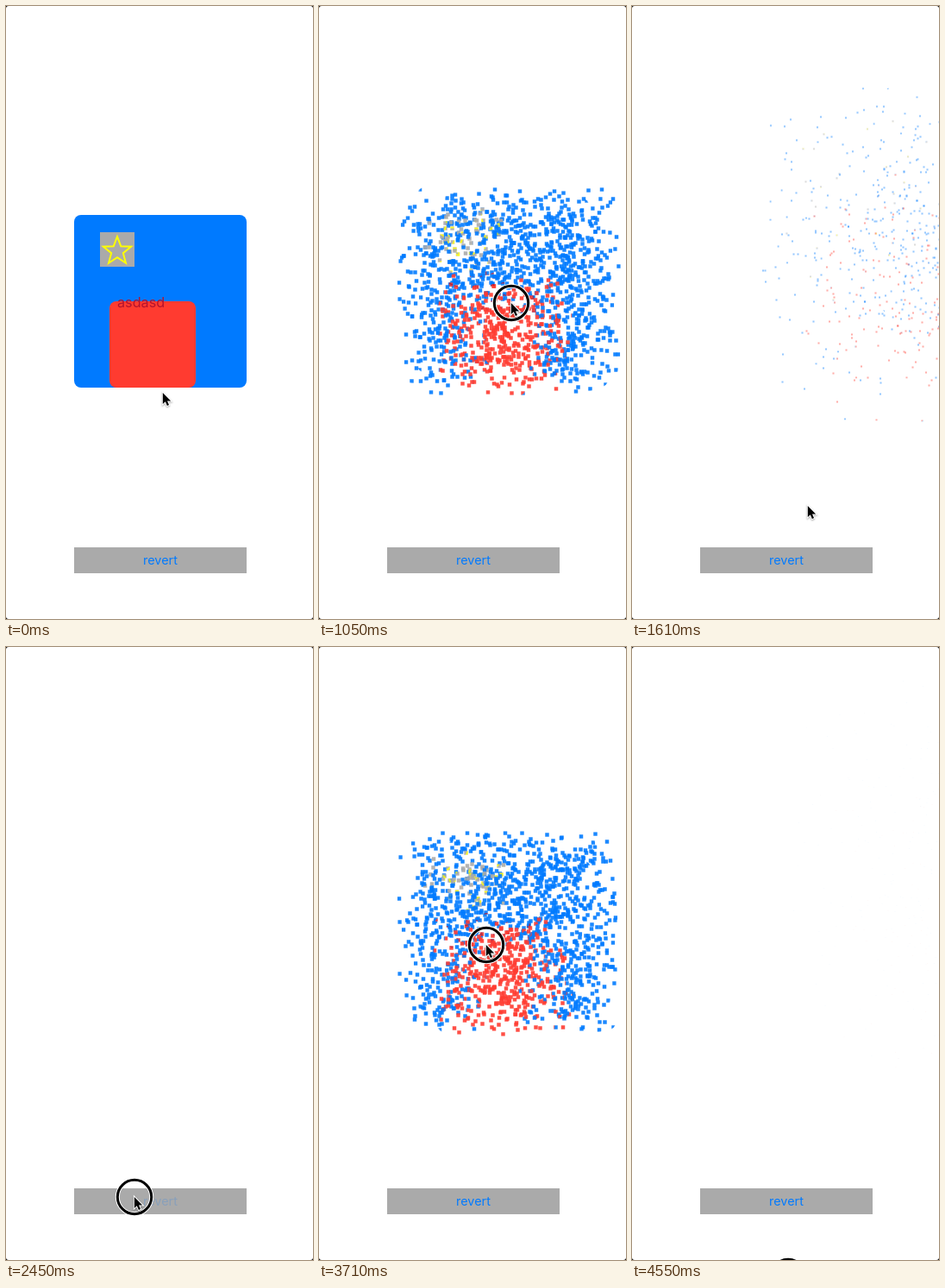
Write an HTML page with a canvas that moves like this. It is 356 px wide and 710 px high and loops after 4.62 s.

```html
<!DOCTYPE html>
<html lang="en">
<head>
<meta charset="utf-8">
<title>Shatter and revert</title>
<style>
  html, body { margin: 0; width: 100%; height: 100%; overflow: hidden; background: #000; }
  canvas { display: block; }
</style>
</head>
<body>
<canvas id="stage" width="356" height="710"></canvas>
<script>
const LOOP = 4620, STEP = 70, LIFE = 1150, FADE = 280;
const CELL = 5, SIZE = 200, LEFT = 79, TOP = 242;
const BLUE = '#007aff', GREY = '#aaaaaa';
const BOOMS = [835, 3495], REVERT = 2380, RELEASE = 2590;
const TAPS = [910, REVERT, 3570, 4480];
const ctx = document.getElementById('stage').getContext('2d');
const clamp = v => Math.max(0, Math.min(1, v));
const mix = (a, b, k) => a + (b - a) * k;
const snap = (v, unit) => Math.round(v / unit) * unit;

// Pointer rests at its start, then makes these moves
const START = { x: 181, y: 447 };
const MOVES = [
  { from: 0, to: 140, x: 181, y: 375 },
  { from: 280, to: 490, x: 234, y: 317 },
  { from: 490, to: 700, x: 222, y: 343 },
  { from: 1330, to: 1610, x: 203, y: 578 },
  { from: 1610, to: 2170, x: 148, y: 636 },
  { from: 2870, to: 3290, x: 193, y: 344 },
  { from: 3780, to: 3990, x: 209, y: 708 },
  { from: 3990, to: 4410, x: 180, y: 728 }
];

function seeded(seed) {
  return () => {
    seed = (seed + 0x6D2B79F5) | 0;
    let n = Math.imul(seed ^ (seed >>> 15), 1 | seed);
    n = (n + Math.imul(n ^ (n >>> 7), 61 | n)) ^ n;
    return ((n ^ (n >>> 14)) >>> 0) / 4294967296;
  };
}

function makeCells(seed) {
  const rand = seeded(seed), cells = [];
  for (let y = 0; y < SIZE; y += CELL)
    for (let x = 0; x < SIZE; x += CELL)
      cells.push({ x, y, dx: mix(102, 680, rand()), dy: mix(-218, 60, rand()) });
  return cells;
}

function roundBox(c, x, y, w, h, r, color) {
  c.fillStyle = color;
  c.beginPath();
  c.roundRect(x, y, w, h, r);
  c.fill();
}

function label(c, text, x, y, size, color, align) {
  c.font = `${size}px Inter, Roboto, sans-serif`;
  c.textAlign = align;
  c.fillStyle = color;
  c.fillText(text, x, y);
}

function makeCard() {
  const card = document.createElement('canvas');
  card.width = card.height = SIZE;
  const c = card.getContext('2d');
  roundBox(c, 0, 0, SIZE, SIZE, 8, BLUE);
  c.fillStyle = GREY;
  c.fillRect(30, 20, 40, 40);
  c.beginPath();
  for (let i = 0; i < 10; i++) {
    const r = i % 2 ? 7.2 : 17, a = i * Math.PI / 5;
    c.lineTo(50 + r * Math.sin(a), 42 - r * Math.cos(a));
  }
  c.closePath();
  c.strokeStyle = '#ffff00';
  c.lineWidth = 2;
  c.stroke();
  roundBox(c, 41, 100, 100, 100, 8, '#ff3b30');
  label(c, 'asdasd', 50, 107, 16.2, '#b4142f', 'left');
  return card;
}

const card = makeCard();
const cardFill = ctx.createPattern(card, 'no-repeat');
const bursts = BOOMS.map(start => ({ start, cells: makeCells(start) }));
const arrow = new Path2D('M.8 1V14L3.8 11.2 5.9 16 8 15 6 10.4H10.2Z');

// Each cell is a shrinking, fading window onto the card
function drawBurst(cells, age) {
  const s = age / 1050, k = 1 - Math.pow(clamp(age / LIFE), 1.35);
  const pad = CELL * (1 - k) / 2;
  const px = Math.pow(s, 1.4), py = Math.pow(s, 1.2);
  ctx.save();
  ctx.globalAlpha = k;
  ctx.fillStyle = cardFill;
  for (const { x, y, dx, dy } of cells) {
    const cx = LEFT + x + pad + snap(dx * px, 0.5);
    const cy = TOP + y + pad + snap(dy * py, 1);
    ctx.setTransform(k, 0, 0, k, cx - x * k, cy - y * k);
    ctx.fillRect(x, y, CELL, CELL);
  }
  ctx.restore();
}

function drawCard(t) {
  const burst = bursts.find(b => t >= b.start && t < b.start + LIFE);
  if (burst) return drawBurst(burst.cells, t - burst.start);
  ctx.globalAlpha = t < BOOMS[0] ? 1 : clamp((t - RELEASE) / FADE);
  ctx.drawImage(card, LEFT, TOP);
  ctx.globalAlpha = 1;
}

function drawButton(t) {
  ctx.fillStyle = GREY;
  ctx.fillRect(79, 627, 200, 30);
  ctx.globalAlpha = t < REVERT ? 1 : mix(0.2, 1, clamp((t - RELEASE) / FADE));
  label(ctx, 'revert', 179, 647, 14.4, BLUE, 'center');
  ctx.globalAlpha = 1;
}

function pointerAt(t) {
  let { x, y } = START;
  for (const m of MOVES) {
    const k = clamp((t - m.from) / (m.to - m.from));
    x = mix(x, m.x, k);
    y = mix(y, m.y, k);
  }
  return [x, y];
}

function ring(color, width) {
  ctx.beginPath();
  ctx.arc(1, 1, 19.7, 0, 2 * Math.PI);
  ctx.strokeStyle = color;
  ctx.lineWidth = width;
  ctx.stroke();
}

function drawPointer(t) {
  ctx.save();
  ctx.translate(...pointerAt(t));
  if (TAPS.some(tap => t >= tap && t < tap + FADE)) {
    ring('#fff', 5);
    ring('#000', 3);
  }
  ctx.strokeStyle = '#fff';
  ctx.lineWidth = 2;
  ctx.shadowColor = 'rgba(0,0,0,.35)';
  ctx.shadowBlur = 2;
  ctx.shadowOffsetY = 1;
  ctx.stroke(arrow);
  ctx.shadowColor = 'transparent';
  ctx.fillStyle = '#000';
  ctx.fill(arrow);
  ctx.restore();
}

function draw(now) {
  const t = Math.floor((now % LOOP) / STEP) * STEP;
  ctx.fillStyle = '#000';
  ctx.fillRect(0, 0, 356, 710);
  roundBox(ctx, 0, 0, 356, 710, 3, '#fff');
  drawCard(t);
  drawButton(t);
  drawPointer(t);
  requestAnimationFrame(draw);
}
requestAnimationFrame(draw);
</script>
</body>
</html>
```
